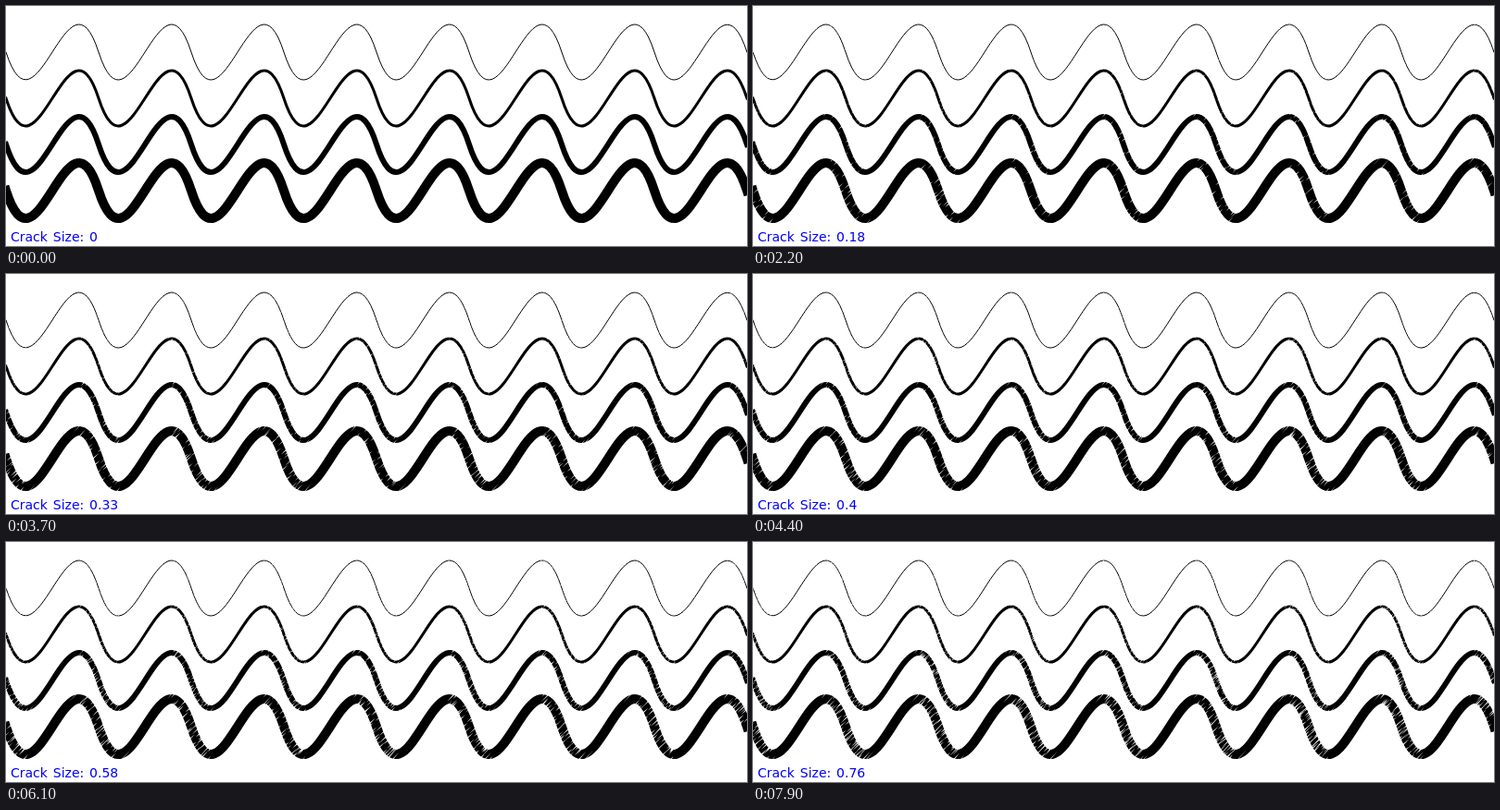
An HTML page with a canvas that plays this animation: 800 px wide and 260 px high, repeating every 8000 ms.

```html
<!DOCTYPE html>
<html>
<head>
<meta charset="utf-8">
<style>
  html, body { margin: 0; width: 100%; height: 100%; overflow: hidden; background: #fff; }
  canvas { display: block; }
</style>
</head>
<body>
<canvas id="stage" width="800" height="260"></canvas>
<script>
const ctx = document.getElementById('stage').getContext('2d');
const LOOP = 8000, STEP = 100;
const PERIOD = 100, PULL = 104;
const WIDTHS = [1, 3, 6, 10];
const CRACK_DIR = Math.SQRT1_2;

function seededRandom(seed) {
  let s = seed;
  return () => {
    s = (s + 0x6D2B79F5) | 0;
    let r = Math.imul(s ^ (s >>> 15), 1 | s);
    r = (r + Math.imul(r ^ (r >>> 7), 61 | r)) ^ r;
    return ((r ^ (r >>> 14)) >>> 0) / 4294967296;
  };
}

// Height and slope of the wave; same curve as the Béziers in drawWave.
const waveY = u => 3 * PULL * u * (1 - u) * (1 - 2 * u);
const waveSlope = u => 3 * PULL * (1 - 6 * u + 6 * u * u) / PERIOD;

function drawWave(y, width) {
  ctx.lineWidth = width;
  ctx.beginPath();
  ctx.moveTo(0, y);
  for (let x = 0; x < 800; x += PERIOD) {
    ctx.bezierCurveTo(x + PERIOD / 3, y + PULL, x + PERIOD * 2 / 3, y - PULL, x + PERIOD, y);
  }
  ctx.stroke();
}

// Thin diagonal wedges cut inwards from one edge (side = 1 or -1).
function drawCracks(y, width, side, size, random) {
  const gap = 3.2 + 11 * Math.exp(-size * 3);
  let x = 0;
  ctx.beginPath();
  while (x < 800) {
    const u = x / PERIOD % 1, slope = waveSlope(u);
    const length = Math.hypot(1, slope);
    const nx = -slope / length * side, ny = side / length;
    const facing = (nx - ny) * CRACK_DIR;
    const depth = width * (0.25 + (0.45 + 0.4 * size) * random());
    const base = (0.35 + 0.35 * random()) * (0.8 + 0.5 * size);
    if (Math.abs(facing) > 0.5) {
      const px = x + nx * width / 2, py = y + waveY(u) + ny * width / 2;
      const reach = -Math.sign(facing) * depth / Math.abs(facing) * CRACK_DIR;
      const tx = base / length, ty = base * slope / length;
      ctx.moveTo(px - tx + nx, py - ty + ny);
      ctx.lineTo(px + tx + nx, py + ty + ny);
      ctx.lineTo(px + reach, py - reach);
      ctx.closePath();
    }
    x += gap * (0.3 + 1.4 * random()) / length;
  }
  ctx.fill();
}

function draw(time) {
  const step = Math.floor(time / STEP);
  const percent = Math.max(0, step - 4) + (step >= 61 ? 1 : 0);
  const size = percent / 100;

  ctx.fillStyle = '#fff';
  ctx.fillRect(0, 0, 800, 260);
  ctx.strokeStyle = '#000';
  ctx.lineCap = 'square';
  WIDTHS.forEach((width, i) => {
    const y = 50 + 50 * i;
    drawWave(y, width);
    if (!percent) return;
    const random = seededRandom(percent * 101 + i * 7919);
    for (const side of [1, -1]) drawCracks(y, width, side, size, random);
  });

  ctx.fillStyle = '#00f';
  ctx.font = '14px Verdana, "DejaVu Sans", sans-serif';
  ctx.wordSpacing = '1.4px';
  ctx.fillText('Crack Size: ' + size, 5, 255);
}

function tick() {
  draw(performance.now() % LOOP);
  requestAnimationFrame(tick);
}
tick();
</script>
</body>
</html>
```
